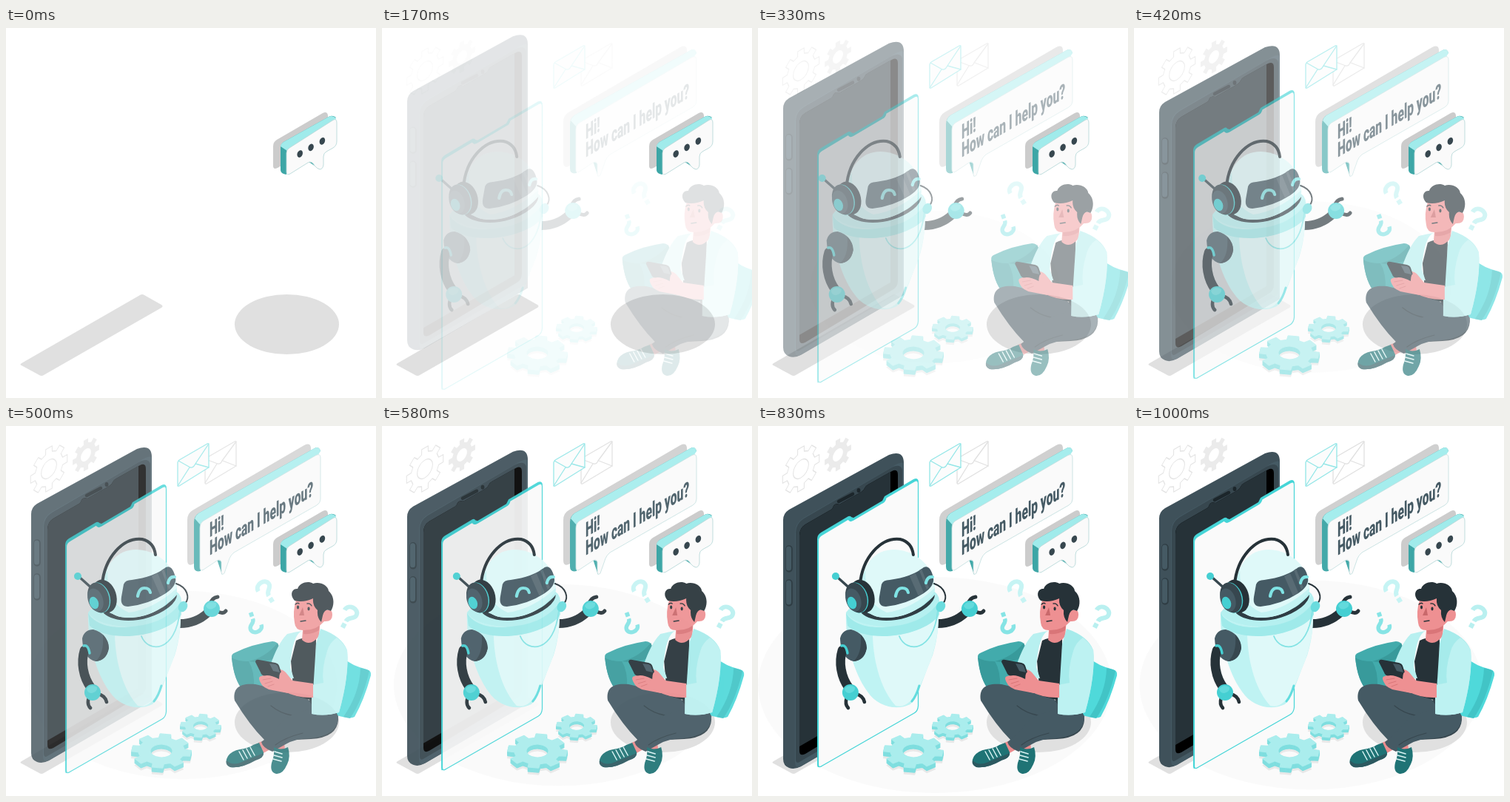
These frames come from a looping animation (500 px wide and 500 px high, 1.04 s). An HTML page:

```html
<!DOCTYPE html>
<html lang="en">
<head>
<meta charset="utf-8">
<title>Chat assistant</title>
<style>
html, body { margin: 0; width: 100%; height: 100%; overflow: hidden; background: #fff; }
svg { display: block; width: 100vw; height: 100vh; }
.line { fill: none; stroke-linecap: round; stroke-linejoin: round; }
text { font: 800 28px Roboto, "Open Sans", sans-serif; fill: #455a64; }
</style>
</head>
<body>
<svg viewBox="0 0 500 500">
  <g id="ground"><ellipse cx="239" cy="350" rx="231.5" ry="141.5" fill="#fafafa"/></g>

  <g fill="#e0e0e0">
    <path d="M21 453L181 361Q184 359 187 361L210 374Q213 376 210 378L51 469Q48 471 45 469L21 456Q18 455 21 453Z"/>
    <ellipse cx="379.5" cy="400.5" rx="70.5" ry="40.5"/>
  </g>

  <g class="fade" id="wallGears"></g>

  <g class="fade line" stroke-width="1.3">
    <g stroke="#e0e0e0">
      <path d="M271 43L309 21Q311 20 311 22V54L271 78Q269 79 269 76V46Z" fill="#fff"/>
      <path d="M270 45L286 51Q290 52 292 47L311 21M269 77L285 51M311 54L293 47"/>
    </g>
    <g stroke="#92e6e7">
      <path d="M234 46L272 24Q274 23 274 26V56L234 81Q232 82 232 79V49Z" fill="#fcfcfc"/>
      <path d="M233 47L249 56Q253 57 256 51L274 24M232 81L248 56M274 56L256 51"/>
    </g>
  </g>

  <g class="fade" id="floorGears"></g>

  <g id="phone">
    <path d="M34 125Q34 116 42 111L177 37Q197 30 197 48V377L58 458Q49 463 42 460Q34 457 34 448Z" fill="#3f515a"/>
    <path d="M50 143Q50 129 62 122L180 54Q192 46 197 48V377L58 458Q50 462 50 452Z" fill="#455a64"/>
    <path d="M51 142Q51 130 62 123L179 55Q192 48 195 57V371L56 452Q51 455 51 448Z" fill="#37474f"/>
    <path d="M56 146Q56 136 64 131L97 112Q101 110 102 106Q104 102 110 104L138 88Q143 85 144 82Q145 79 149 77L181 59Q189 55 189 64V358Q189 366 182 370L64 441Q56 445 56 437Z" fill="#000"/>
    <path d="M56 146Q56 136 64 131L97 112Q101 110 102 106Q104 102 110 104L138 88Q143 85 144 82Q145 79 149 77L179 60V360L56 431Z" fill="#263238"/>
    <path class="line" d="M109 100L128 90" stroke="#1c262b" stroke-width="4.5"/>
    <ellipse cx="136" cy="85" rx="2.4" ry="3" fill="#1c262b"/>
    <g class="line" stroke-width="9.5" stroke="#2f3d44"><path d="M42 164V191M42 210V237"/></g>
    <g class="line" stroke-width="7" stroke="#455a64"><path d="M41.5 164V190M41.5 210V236"/></g>
  </g>

  <g id="screen">
    <path d="M80 155Q80 149 85 146L122 124Q125 123 126 125L129 126L168 103L171 97L210 74Q216 71 217 77L215 82L86 154L83 462Q80 465 80 460Z" fill="#45d5d7"/>
    <path d="M81.5 157Q81.5 152 87 149L122 128Q124 132 129 129L168 106Q172 104 173 99L211 77Q216 74 216.5 79V380Q216 387 211 390L87 461Q81.5 465 81.5 459Z" fill="#fafafa" stroke="#45d5d7" stroke-width="1.2"/>
  </g>

  <g id="robot">
    <path class="line" d="M238 267Q262 268 279 252" stroke="#263238" stroke-width="12"/>
    <g class="line" stroke="#263238" stroke-width="5"><path d="M282 241Q284 232 292 231M291 250Q299 255 303 250"/></g>
    <circle cx="284" cy="247" r="11" fill="#45cfd2"/>
    <path d="M276 243Q281 235 290 239Q292 244 285 247Q279 249 276 243Z" fill="#62dadc"/>
    <path d="M117 253C116 289 126 331 146 359C160 380 186 385 204 376C215 365 222 338 234 310C242 285 243 260 242 234L230 220L130 235Z" fill="#bff3f3"/>
    <path d="M153 282C154 323 166 358 184 378C205 384 216 355 231 318C240 292 242 273 242 258Q202 289 153 282Z" fill="#dff9f9"/>
    <path d="M117 252C126 275 190 288 243 235V255C225 283 149 296 119 270Z" fill="#9feaea"/>
    <path d="M117 252Q125 241 140 240L232 222Q243 225 243 237C228 260 200 271 169 271Q129 269 117 252Z" fill="#b5f0f0"/>
    <path class="line" d="M206 372Q212 365 216 351" stroke="#62dcde" stroke-width="3"/>
    <path class="line" d="M189 284C198 307 235 307 241 250" stroke="#82e3e4" stroke-width="1.8"/>
    <path d="M137 245C151 263 204 267 237 228Q237 236 226 245C195 268 153 267 138 253Z" fill="#2f3d44"/>
    <path d="M137 217C139 187 156 167 182 167C216 168 239 196 237 221C220 249 196 259 171 259C146 259 136 244 137 217Z" fill="#dff9f9"/>
    <path d="M137 217Q138 205 143 195Q143 219 150 234Q158 246 172 252Q205 248 237 219V223C220 249 196 259 171 259C146 259 136 244 137 217Z" fill="#c4f3f3"/>
    <path d="M165 214Q167 208 176 208Q206 204 222 191Q231 187 235 205Q237 216 222 226Q199 241 171 244Q160 244 162 231Z" fill="#455a64"/>
    <path d="M203 203L211 199L222 225L215 230ZM216 195L219 193L229 218L226 221Z" fill="#586b74"/>
    <g class="line" stroke="#7fe3e4" stroke-width="4.2"><path d="M184 230Q186 219 193 219Q200 219 201 225M225 212Q227 203 234 204"/></g>
    <path class="line" d="M136 214C139 178 164 150 190 153Q206 157 208 174" stroke="#263238" stroke-width="4"/>
    <path class="line" d="M236 213C251 218 255 232 248 240" stroke="#263238" stroke-width="2"/>
    <ellipse cx="245" cy="244" rx="6" ry="7.5" transform="rotate(28 245 244)" fill="#6adcde"/>
    <path class="line" d="M105 204L124 221" stroke="#37474f" stroke-width="3.4"/>
    <circle cx="103" cy="203" r="5" fill="#45cfd2"/>
    <ellipse cx="139" cy="230" rx="16" ry="23" transform="rotate(-18 139 230)" fill="#263238"/>
    <ellipse cx="132" cy="232" rx="14.5" ry="21" transform="rotate(-18 132 232)" fill="#45cfd2"/>
    <ellipse cx="131" cy="232" rx="14" ry="21" transform="rotate(-18 131 232)" fill="#37474f"/>
    <ellipse cx="127" cy="235" rx="10" ry="16" transform="rotate(-18 127 235)" fill="#455a64"/>
    <ellipse cx="125" cy="239" rx="6" ry="8.5" transform="rotate(-20 125 239)" fill="#45cfd2"/>
    <path d="M109 287Q112 275 124 275Q143 280 145 300Q142 317 127 318Q110 314 109 287Z" fill="#455a64"/>
    <path d="M137 282Q145 290 145 300Q142 317 127 318Q139 308 137 282Z" fill="#37474f"/>
    <path class="line" d="M112 303C107 319 110 339 121 354" stroke="#263238" stroke-width="12.5"/>
    <path class="line" d="M111 297Q117 295 119 307" stroke="#45cfd2" stroke-width="3.5"/>
    <g class="line" stroke="#263238" stroke-width="4.6"><path d="M118 367Q115 376 120 381M130 362Q140 364 142 373"/></g>
    <circle cx="123" cy="360" r="11" fill="#45cfd2"/>
    <path d="M115 355Q121 348 129 353Q130 359 122 361Q116 361 115 355Z" fill="#62dadc"/>
  </g>

  <g class="fade">
    <path d="M245 127Q245 118 252 114L403 26Q411 22 412 29V104L252 187Q245 190 245 181Z" fill="#d0d0d0"/>
    <path d="M254 130Q254 122 260 118L417 30Q423 27 425 34L263 139V196Q254 198 254 190ZM285 180L292 201L297 186Z" fill="#43a9a9"/>
    <path d="M255 125Q256 121 260 118L417 30Q423 27 425 34L420 42L263 134Z" fill="#a5eded"/>
    <path d="M262 138Q262 131 267 128L418 40Q425 36 425 43V99Q425 104 420 107L308 171Q304 174 302 179L295 199Q292 202 291 198V184Q290 179 285 182L267 194Q262 197 262 191Z" fill="#fafafa" stroke="#bfdede" stroke-width=".8"/>
    <text transform="translate(275 150.5) skewY(-30) scale(.557 1)">Hi!</text>
    <text transform="translate(275 175) skewY(-30) scale(.557 1)">How can I help you?</text>
  </g>

  <g>
    <path d="M361 160Q361 154 366 151L428 115Q434 112 435 118V150L367 189Q361 192 361 186Z" fill="#ccc"/>
    <path d="M371 162Q371 157 375 154L436 120Q441 117 446 121L380 165L379 198Q371 197 371 192ZM408 180L424 191L416 179Z" fill="#3da6a6"/>
    <path d="M371 160Q371 157 375 154L436 120Q441 117 446 122L443 130L380 166Z" fill="#a0ebeb"/>
    <path d="M379 169Q379 164 383 162L441 125Q447 121 447 128V153Q447 159 442 162L433 167Q429 169 429 174V185Q428 191 424 191Q420 190 417 186Q413 179 408 182L384 197Q379 200 379 194Z" fill="#fafafa" stroke="#b9dada" stroke-width=".9"/>
    <g fill="#37474f">
      <ellipse cx="397.2" cy="170" rx="3.6" ry="5" transform="rotate(20 397 170)"/>
      <ellipse cx="412.2" cy="161.3" rx="3.6" ry="5" transform="rotate(20 412 161)"/>
      <ellipse cx="427.3" cy="152.7" rx="3.6" ry="5" transform="rotate(20 427 153)"/>
    </g>
  </g>

  <g class="fade" id="questions"></g>

  <g id="person">
    <path d="M299 313Q298 308 304 306Q326 295 354 291Q361 291 363 298L376 343L315 358Q302 344 299 313Z" fill="#42abac"/>
    <path d="M299 313Q306 318 322 318Q330 331 329 354L315 358Q302 344 299 313ZM322 318Q346 312 361 293L366 309Q346 322 322 318Z" fill="#389a9b"/>
    <path d="M449 313Q461 324 482 329Q488 331 487 337Q478 370 465 393Q459 397 438 390Z" fill="#4fd9da"/>
    <path d="M473 327Q482 329 485 331Q476 370 459 395L450 393Q472 361 473 327Z" fill="#42c4c6"/>
    <path d="M410 366Q440 374 443 396Q442 421 406 423L365 425Q372 391 410 366Z" fill="#37474f"/>
    <path d="M303 371C300 353 311 347 331 349L399 365L414 386L374 398L357 431L343 424Q323 404 303 371Z" fill="#455a64"/>
    <path class="line" d="M352 378Q364 388 380 391Q366 403 352 419" stroke="#37474f" stroke-width="1.4"/>
    <path d="M335 428L345 424L349 438L340 443ZM357 430L370 427L371 438H358Z" fill="#ea8c8e"/>
    <path d="M408 381Q438 382 443 392C443 410 431 419 405 422Q386 422 372 430L354 440Q341 435 339 427C356 415 361 402 379 391Z" fill="#455a64"/>
    <path class="line" d="M358 431Q371 421 395 415" stroke="#37474f" stroke-width="1.2"/>
    <path d="M328 431L336 428L342 441Q343 449 331 451Q312 463 297 461Q288 456 294 446Q299 439 310 437Q322 435 328 431Z" fill="#1f7375"/>
    <path d="M292 452Q300 460 313 454L342 442Q342 449 331 452Q312 463 297 461Q290 458 292 452Z" fill="#2c5960"/>
    <path d="M356 434Q365 439 375 434Q379 447 374 457Q368 471 359 470Q350 468 353 455Q357 446 356 434Z" fill="#1f7375"/>
    <g class="line" stroke="#d8f3f3" stroke-width="1.5"><path d="M309 440L315 451M314 438L320 449M319 436L325 447M324 434L330 445M357 440L367 443M356 445L367 448M355 450L366 453"/></g>
    <path d="M386 290Q397 284 413 286L412 372L383 364L379 318Z" fill="#263238"/>
    <path d="M396 262L419 259L417 284Q405 299 394 289Z" fill="#e98a8c"/>
    <path d="M396 273Q409 274 418 264L417 276Q408 282 396 281Z" fill="#d97578"/>
    <path d="M386 235Q381 251 384 266Q385 277 397 276Q414 276 424 264Q435 265 435 255Q435 247 427 249L423 229L399 227Z" fill="#ee9092"/>
    <path d="M384 236C377 229 380 219 388 220C391 211 403 209 409 213C418 210 429 215 430 223C438 230 438 242 433 250Q425 245 422 256L420 265Q414 259 415 249Q408 243 409 233Q396 239 384 236Z" fill="#263238"/>
    <g class="line" stroke="#263238" stroke-width="1.3"><path d="M385 241Q388 238 390 240M401 240Q405 239 407 243M392 264L399 263"/></g>
    <path d="M395 245L390 256L397 256Z" fill="#c9686b"/>
    <ellipse cx="388.5" cy="245" rx="1.6" ry="2.4" fill="#263238"/><ellipse cx="403" cy="247" rx="1.6" ry="2.4" fill="#263238"/>
    <path d="M394 277Q381 282 378 326L383 341L363 340L351 324Q361 294 374 281Q386 278 394 277Z" fill="#b8f0f0"/>
    <path d="M419 274Q448 284 455 303Q458 337 444 387Q425 393 407 389L413 294Z" fill="#a6ebeb"/>
    <path d="M428 304Q420 329 423 347L407 350V368L407 389Q425 393 444 387Q458 337 455 303Q450 293 441 286Q431 293 428 304Z" fill="#bdf2f2"/>
    <path d="M358 331Q365 326 372 333L381 344L409 348V367Q387 368 369 358Z" fill="#ee9092"/>
    <path d="M339 338Q334 339 337 345Q341 355 354 357L375 361L379 349L365 330Q368 348 351 334Z" fill="#ee9092"/>
    <path d="M331 319Q331 315 336 316L358 320Q362 321 363 324L368 339Q367 343 362 342L344 338Q339 337 338 333Z" fill="#263238"/>
    <path d="M350 321L358 322Q361 323 362 327L364 333L355 331Z" fill="#455a64"/>
    <path d="M363 342Q363 331 369 331L383 347L375 361L360 357L340 347Q336 342 340 339Q347 334 363 342Z" fill="#ee9092"/>
    <g class="line" stroke="#d97578" stroke-width="1"><path d="M341 343L352 341M344 348L354 345M348 352L356 349"/></g>
  </g>
</svg>

<script>
const byId = id => document.getElementById(id);
const LOOP = 1040, FRAME = 1000 / 24;

function gearPath(outer, root, hole, teeth) {
  const step = 2 * Math.PI / teeth, points = [];
  for (let i = 0; i < teeth; i++) {
    for (const [part, r] of [[-.3, root], [-.22, outer], [.22, outer], [.3, root]]) {
      const a = (i + part) * step;
      points.push(`${(r * Math.cos(a)).toFixed(2)} ${(r * Math.sin(a)).toFixed(2)}`);
    }
  }
  return `M${points.join("L")}ZM${-hole} 0a${hole} ${hole} 0 1 0 ${2 * hole} 0a${hole} ${hole} 0 1 0 ${-2 * hole} 0Z`;
}

function wallGear(x, y, outer, root, hole, style) {
  return `<path d="${gearPath(outer, root, hole, 8)}" transform="matrix(.866 -.5 0 1 ${x} ${y})" fill-rule="evenodd" stroke-linejoin="round" ${style}/>`;
}

function floorGear(x, y, outer, root, hole, depth) {
  const d = gearPath(outer, root, hole, 8);
  const layer = (dy, fill) => `<path d="${d}" transform="translate(${x} ${y + dy}) scale(1 .577) rotate(8)" fill="${fill}" fill-rule="evenodd" stroke="${fill}" stroke-width="2" stroke-linejoin="round"/>`;
  let out = layer(depth + 3, "#e8e8e8");
  for (let dy = depth; dy > 0; dy--) out += layer(dy, "#7fdedf");
  return out + layer(0, "#aaeded");
}

function question(x, y, angle, size, color) {
  return `<g transform="translate(${x} ${y}) rotate(${angle}) scale(${size})">
    <path d="M-9 -5C-9 -16 9 -16 9 -6C9 1 0 0 0 8" fill="none" stroke="${color}" stroke-width="6.2"/>
    <rect x="-3.3" y="11.5" width="6.6" height="6.6" fill="${color}"/></g>`;
}

byId("wallGears").innerHTML =
  wallGear(58, 58, 29, 22, 12, 'fill="#fff" stroke="#e3e3e3" stroke-width="1.2"') +
  wallGear(108, 39, 21, 15.5, 8, 'fill="#ebebeb"');
byId("floorGears").innerHTML =
  floorGear(263, 405, 27, 20.5, 11, 4) + floorGear(210, 439, 40, 31, 15.5, 6);
byId("questions").innerHTML =
  question(351, 223, -32, .97, "#c6f4f4") +
  question(463, 257, 28, .97, "#b9f0f0") +
  question(336, 267, 160, .88, "#86e4e5");

// Cubic Bézier (.36, -.01, .5, 1.38): settles after a small overshoot.
function ease(x) {
  if (x <= 0 || x >= 1) return x <= 0 ? 0 : 1;
  const curve = (a, b, s) => 3 * a * s * (1 - s) ** 2 + 3 * b * s * s * (1 - s) + s ** 3;
  let low = 0, high = 1;
  for (let i = 0; i < 24; i++) {
    const mid = (low + high) / 2;
    if (curve(.36, .5, mid) < x) low = mid; else high = mid;
  }
  return curve(-.01, 1.38, low);
}

const slides = [["phone", 0, -30], ["screen", 0, 30], ["robot", -30, 0], ["person", 30, 0]]
  .map(([id, dx, dy]) => ({ node: byId(id), dx, dy }));
const ground = byId("ground");
const faders = [...document.querySelectorAll(".fade"), ground, ...slides.map(s => s.node)];

function draw(time) {
  const step = Math.floor((time % LOOP + 5) / FRAME);
  const p = step < 2 ? 0 : ease(step / 24 + .03);
  const rest = 1 - p, scale = .5 + p / 2;
  for (const node of faders) node.setAttribute("opacity", Math.min(1, Math.max(0, p)));
  for (const { node, dx, dy } of slides) node.setAttribute("transform", `translate(${dx * rest} ${dy * rest})`);
  ground.setAttribute("transform", `translate(239 350) scale(${scale}) translate(-239 -350)`);
}

const start = performance.now();
function tick() {
  draw(performance.now() - start);
  requestAnimationFrame(tick);
}
draw(0);
requestAnimationFrame(tick);
</script>
</body>
</html>
```
